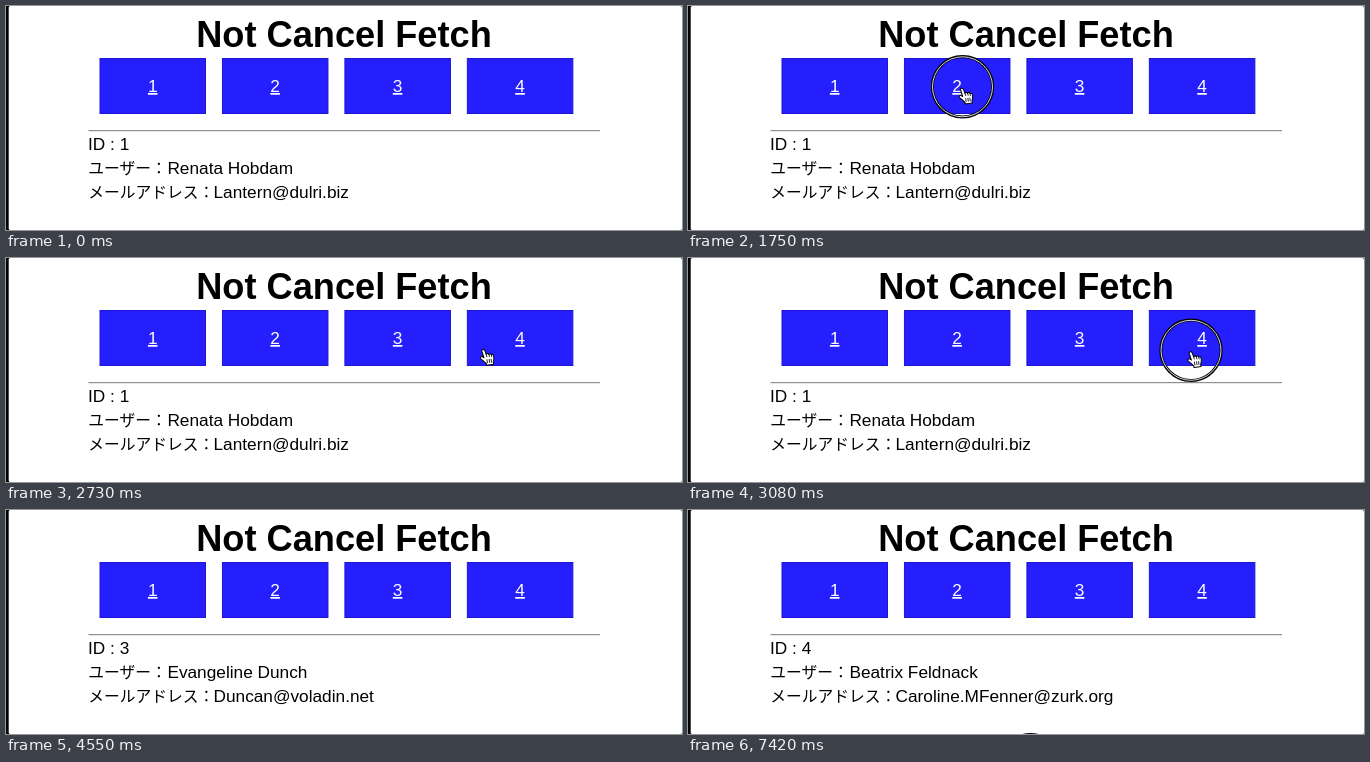
An HTML page for the animation above (7490 ms loop, 676x224 px).

```html
<!DOCTYPE html>
<html lang="ja">
<head>
<meta charset="utf-8">
<title>Not Cancel Fetch</title>
<style>
html, body { margin: 0; width: 100%; height: 100%; overflow: hidden; background: #000; }
svg { display: block; width: 676px; height: 224px; }
text { font-family: "Liberation Sans", Arial, sans-serif; font-size: 17.25px; }
.title { font-size: 36.2px; font-weight: bold; }
.label { font-family: "Noto Sans CJK JP", "Noto Sans CJK", sans-serif; font-size: 15.75px; }
.num { fill: #fff; text-anchor: middle; text-decoration: underline; }
</style>
</head>
<body>
<svg viewBox="0 0 676 224">
  <rect width="676" height="224"/>
  <rect x="2.7" width="673.3" height="224" rx="1.5" fill="#fff"/>
  <text class="title" x="190.2" y="41">Not Cancel Fetch</text>
  <g id="buttons"></g>
  <rect x="82.5" y="124" width="511.5" height="1.2" fill="#8f8f8f"/>
  <text id="id" x="82" y="144"></text>
  <text class="label" x="82.3" y="168">ユーザー：</text>
  <text id="user" x="161.4" y="168"></text>
  <text class="label" x="82.3" y="192">メールアドレス：</text>
  <text id="mail" x="207.5" y="192"></text>
  <g id="ring" fill="none">
    <circle r="30.2" stroke="#000" stroke-width="3"/>
    <circle r="30" stroke="#fff" stroke-width="1" opacity=".85"/>
  </g>
  <path id="arrow" d="M0 0V14.5L3.4 11.4L5.8 16.8L8.2 15.8L5.9 10.4H10.4Z" stroke="#fff" stroke-width="1.2"/>
  <g id="hand" stroke="#000" stroke-linejoin="round" stroke-linecap="round">
    <g transform="rotate(-8)">
      <path fill="#fff" stroke-width="1" d="M-1.5 1.8C-1.7 0 .9 -.4 1.4 1.4L2.4 5.6C3 4.6 4.7 4.8 5 6C5.6 5.1 7.1 5.4 7.4 6.6C8.2 6 9.4 6.6 9.5 7.8C9.8 10.4 9.4 12 8.3 14V16.4H1.2V14.6C-.6 12.8 -1.8 11 -3.5 9.2C-4.6 7.8 -3 6.4 -1.7 7.4L-.3 8.6Z"/>
      <path fill="none" stroke-width=".8" d="M2.4 5.6L2.8 8M5 6L5.3 8.2M7.4 6.6L7.5 8.6M2.4 11V14M4.6 11V14M6.6 11V14"/>
    </g>
  </g>
</svg>
<script>
const LOOP = 7490, STEP = 70;
const $ = id => document.getElementById(id);

const users = [
  [0, "Renata Hobdam", "Lantern@dulri.biz"],
  [3920, "Boris Harvoll", "Vaughn@dunvisa.tv"],
  [4550, "Evangeline Dunch", "Duncan@voladin.net"],
  [5390, "Beatrix Feldnack", "Caroline.MFenner@zurk.org"]
];

// pointer tip: time, x, y
const path = [
  [560, 315, 190], [980, 277, 76], [1120, 275, 78], [1260, 273.8, 82],
  [1890, 273.8, 82], [2240, 386, 83], [2450, 386, 83],
  [2940, 502.5, 93.5], [3360, 502.5, 93.5], [3430, 567.5, 92.5]
];

// pressed: from, to, ring centre
const clicks = [
  [1750, 1890, 274.5, 80.8],
  [2310, 2450, 386.5, 81.8],
  [3010, 3150, 503, 92.3],
  [7420, 7490, 342.5, 254.7]
];

$("buttons").innerHTML = [1, 2, 3, 4].map((n, i) => {
  const x = 93.5 + i * 122.45;
  return `<rect x="${x + .5}" y="52.5" width="105.5" height="55" fill="#241ffc" stroke="#1c16d2"/>` +
    `<text class="num" x="${x + 53.2}" y="86">${n}</text>`;
}).join("");

function pointer(t) {
  const i = path.findIndex(p => p[0] > t);
  if (i < 0) return path[path.length - 1].slice(1);
  if (i === 0) return path[0].slice(1);
  const [t0, x0, y0] = path[i - 1], [t1, x1, y1] = path[i];
  const k = Math.sin((t - t0) / (t1 - t0) * Math.PI / 2);
  return [x0 + (x1 - x0) * k, y0 + (y1 - y0) * k];
}

function place(id, shown, x, y) {
  const el = $(id);
  el.style.display = shown ? "" : "none";
  if (shown) el.setAttribute("transform", `translate(${x} ${y})`);
}

function render(ms) {
  const t = Math.floor((ms % LOOP) / STEP) * STEP;

  const n = users.filter(u => u[0] <= t).length;
  const [, user, mail] = users[n - 1];
  $("id").textContent = "ID : " + n;
  $("user").textContent = user;
  $("mail").textContent = mail;

  const visible = t >= 560 && t < 3500;
  const overLink = t >= 1120 && t < 3430;
  const [x, y] = pointer(t);
  place("arrow", visible && !overLink, x, y);
  place("hand", visible && overLink, x, y);

  const hit = clicks.find(c => t >= c[0] && t < c[1]);
  place("ring", !!hit, hit && hit[2], hit && hit[3]);
}

const start = performance.now();
function tick() {
  render(performance.now() - start);
  requestAnimationFrame(tick);
}
tick();
</script>
</body>
</html>
```
